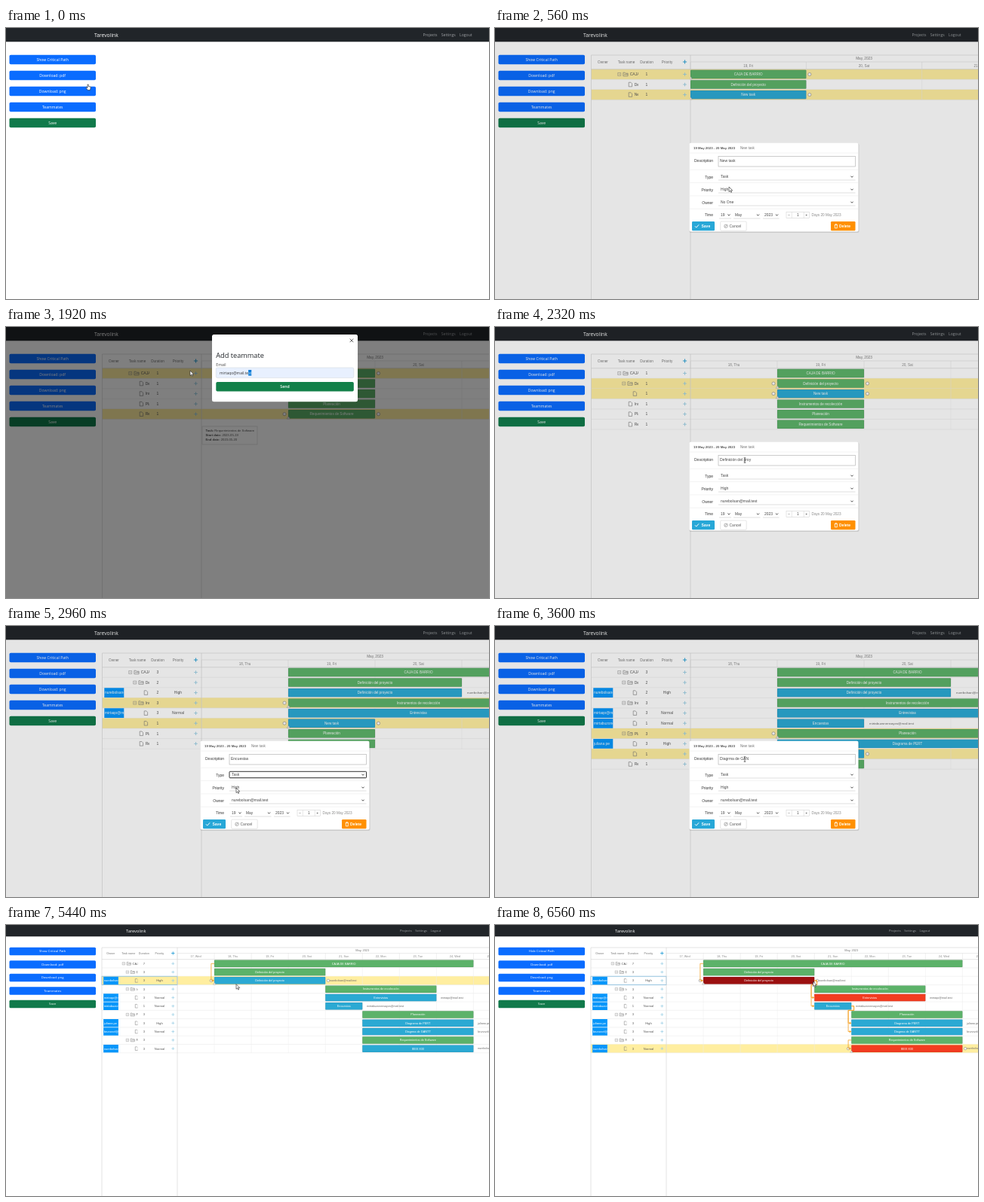
An HTML page for the animation above (6640 ms loop, 640 by 360 pixels).

```html
<!DOCTYPE html>
<html lang="es">
<head>
<meta charset="utf-8">
<title>Project planner</title>
<style>
  html, body { margin: 0; width: 100%; height: 100%; overflow: hidden; background: #fff; }
  #stage { display: block; width: 100vw; height: 100vh; }
  text { font-family: "Liberation Sans", Arial, sans-serif; white-space: pre; }
  .ui { font-family: "Open Sans", "Noto Sans", sans-serif; }
</style>
</head>
<body>
<svg id="stage" viewBox="0 0 640 360"></svg>
<script>
const LOOP = 6640, STEP = 80;
const GREEN = '#5cb269', BLUE = '#2ba9d3', YELLOW = '#ffeea0', ORANGE = '#f5a021';
const MIRTA = 'mirtaqo@mail.test', NURE = 'nurebolsan@mail.test';

// SVG helpers
const rect = (x, y, w, h, fill, more = '') =>
  `<rect x="${x}" y="${y}" width="${w}" height="${h}" fill="${fill}" ${more}/>`;
const path = (d, stroke, width = .6, fill = 'none') =>
  `<path d="${d}" stroke="${stroke}" stroke-width="${width}" fill="${fill}"/>`;
const line = (x1, y1, x2, y2, color, width) => path(`M${x1} ${y1}L${x2} ${y2}`, color, width);
const text = (x, y, str, size, fill, more = '') =>
  `<text x="${x}" y="${y + size * .35}" font-size="${size}" fill="${fill}" ${more}>${str}</text>`;
const MID = ' text-anchor="middle"', END = ' text-anchor="end"', BOLD = ' font-weight="bold"', UI = ' class="ui"';
const clip = (x, y, w, h, inner) =>
  `<svg x="${x}" y="${y}" width="${w}" height="${h}" viewBox="${x} ${y} ${w} ${h}">${inner}</svg>`;
const clamp = v => Math.max(0, Math.min(1, v));
const mix = (a, b, k) => a + (b - a) * k;

// Page zoom and timeline scale over time
const plain = { at: 0, z: 1, left: 127.5, grid: 131.5, total: 460, day0: 19, days: 3, title: 117, links: 552.5 };
const views = [
  plain,
  { ...plain, at: 1200, day0: 18, days: 4 },
  { at: 4160, z: 1.25, left: 128, grid: 150.5, total: 440, day0: 18, days: 6, title: 54.5, links: 598 },
  { at: 5040, z: 5 / 6, left: 127, grid: 100, total: 490.5, day0: 17, days: 10, title: 159, links: 522 }
];

// born: dialog opens, saved: dialog closes; move: [begin, end, new start day]
const task = (name, level, born, saved, more) =>
  ({ name, level, born, saved, days: 1, project: level < 2, ...more });
const tasks = [
  task('CAJA DE BARRIO', 0, 160, 320),
  task('Definición del proyecto', 1, 320, 480),
  task('Definición del proyecto', 2, 2160, 2400,
    { days: 2, owner: NURE, priority: 'High', move: [5200, 5400, 18], stretch: true, critical: '#9c1010' }),
  task('Instrumentos de recolección', 1, 480, 880),
  task('Entrevistas', 2, 2400, 2640,
    { days: 3, owner: MIRTA, priority: 'Normal', move: [4160, 4240, 21], critical: '#f23c20' }),
  task('Encuestas', 2, 2640, 3040,
    { owner: 'mirtabuzonensayos@mail.test', priority: 'Normal', move: [4240, 4400, 21] }),
  task('Planeación', 1, 880, 1200),
  task('Diagrama de PERT', 2, 3040, 3280,
    { days: 3, owner: 'juliana pe', priority: 'High', move: [4400, 4583, 22] }),
  task('Diagrma de GANTT', 2, 3280, 3760,
    { days: 3, owner: 'brunovel@mail.test', priority: 'Normal', move: [4640, 4800, 22] }),
  task('Requerimientos de Software', 1, 1200, 1520),
  task('IEEE 830', 2, 3760, 4080,
    { days: 3, owner: NURE, priority: 'Normal', move: [4800, 4960, 22], critical: '#f23c20' })
];
const [DEF, REQ, IEEE] = [2, 9, 10].map(i => tasks[i]);
tasks.forEach((item, i) =>
  item.parent = tasks.slice(0, i).reverse().find(other => other.level < item.level));
const links = [[0, 2], [2, 4], [2, 5], [5, 7], [5, 8], [9, 10]];

const childrenOf = (item, t) => tasks.filter(other => other.parent === item && other.born <= t);
const draggedAt = t => t >= 4160 && t < 5040 &&
  tasks.find(item => item.move && t >= item.move[0] && t < item.move[1] + 40);

function span(item, t) {
  const spans = childrenOf(item, t).map(child => span(child, t));
  if (spans.length) return [Math.min(...spans.map(s => s[0])), Math.max(...spans.map(s => s[1]))];
  const days = t < item.saved ? 1 : item.days;
  if (!item.move) return [19, 19 + days];
  const [begin, end, day] = item.move;
  const start = mix(19, day, clamp((t - begin) / (end - begin)));
  return [start, (item.stretch ? 19 : start) + days];
}

const dayX = (view, day) => view.left + view.grid + (day - view.day0) * view.total / view.days;
function rowY(view, item, t) {
  const index = tasks.filter(other => other.born <= t).indexOf(item);
  return (61.5 + 13.55 * index) * view.z;
}

function page(view, t) {
  const { z } = view;
  let out = rect(0, 0, 640, 18.3 * z, '#212529') +
    text(view.title, 9.5 * z, 'Tarevolink', 6.75 * z, '#fff', UI);
  ['Projects', 'Settings', 'Logout'].forEach((label, i) =>
    out += text(view.links + i * 24.3 * z, 9.6 * z, label, 5.1 * z, '#a0a3a6', UI));
  const labels = [(t < 5840 ? 'Show' : 'Hide') + ' Critical Path',
    'Download: pdf', 'Download: png', 'Teammates', 'Save'];
  labels.forEach((label, i) => {
    const y = (42 + 21 * i) * z;
    out += rect(4.5, y - 6.2 * z, 114.5, 12.4 * z, i < 4 ? '#0a6cff' : '#117a4b', `rx="${1.8 * z}"`) +
      text(61.7, y, label, 5.1 * z, '#fff', UI + MID);
  });
  return out;
}

function treeIcon(x, y, z, open) {
  const shape = open
    ? path('M-2 -2h4v4h-4zm1 2h2', '#888', .5) + path('M5.2 2.3v-4.6h2.2l1 1h3v3.6zm1 -2.2h5.2', '#777')
    : path('M6.5 -2.8h2.8l1.6 1.6v4h-4.4z', '#777');
  return `<g transform="translate(${x} ${y}) scale(${z})">${shape}</g>`;
}

const plus = (x, y, r, color, width) => path(`M${x - r} ${y}h${2 * r}M${x} ${y - r}v${2 * r}`, color, width);

function tooltip(item, x, y, z, from, to) {
  const lines = [['Task:', item.name], ['Start date:', '2023-05-' + from], ['End date:', '2023-05-' + to]];
  const width = (item.name.length * 2 + 21) * z;
  return rect(x, y, width, 24 * z, '#fff', 'stroke="#ccc" stroke-width=".5"') +
    lines.map(([key, value], i) => text(x + 4.5 * z, y + (6 + 6 * i) * z,
      `<tspan${BOLD}>${key}</tspan> ${value}`, 4.2 * z, '#555')).join('');
}

function taskRow(view, item, t, marked, focused) {
  const { z, left, grid } = view;
  const k = grid / 131.5, pitch = 13.55 * z;
  const y = rowY(view, item, t), rowTop = y - pitch / 2;
  const [start, end] = span(item, t);
  const pending = t < item.saved, name = pending ? 'New task' : item.name;
  const treeX = left + 29.5 * k + (7.7 + 6 * item.level) * z;
  let cells = marked ? rect(left, rowTop, 640 - left, pitch, YELLOW) : '';
  cells += line(left, rowTop + pitch, 640, rowTop + pitch, '#e6e6e6', .5) +
    clip(left + 29.5 * k, rowTop, 33 * k, pitch,
      treeIcon(treeX, y, z, childrenOf(item, t).length) + text(treeX + 14 * z, y, name, 5 * z, '#555')) +
    text(left + 73.5 * k, y, Math.round(end - start), 5 * z, '#555', MID) +
    plus(left + 124 * k, y, 2.3 * z, '#9bcfe4', .9 * z);

  const x = dayX(view, start), xEnd = dayX(view, end), h = 11.4 * z;
  const color = t >= 5840 && item.critical || (item.project && !pending ? GREEN : BLUE);
  let bar = rect(x, y - h / 2, xEnd - x, h, color,
    `rx="${.8 * z}" stroke="#000" stroke-opacity=".18" stroke-width=".5"`) +
    text((x + xEnd) / 2, y, name, 4.6 * z, '#fff', MID);

  if (item.owner && !pending) {
    cells += clip(left + 2.8 * k, rowTop + .4, 26 * k, pitch - .8,
      rect(left, rowTop, 40, pitch, '#0796fa') + text(left + 3.5 * k, y, item.owner, 4.9 * z, '#fff')) +
      text(left + 100.5 * k, y, item.priority, 5 * z, '#555', MID);
    bar += text(xEnd + 7 * z, y, item.owner, 4.4 * z, '#666');
  }
  if (focused) cells += rect(left, rowTop, grid, pitch, 'none', 'stroke="#7fb9dc" stroke-width=".8"');
  if (marked || focused) {
    for (const cx of [x - 5 * z, xEnd + 4.5 * z])
      bar += `<circle cx="${cx}" cy="${y}" r="${2.1 * z}" fill="#fff" stroke="#888" stroke-width=".6"/>`;
    bar += path(`M${x - 2 * z} ${y + 6.3 * z}l${2.2 * z} ${-3 * z}l${2.2 * z} ${3 * z}z`, '#999', .4, '#eee');
  }
  return [cells, bar];
}

function link(view, a, b, t) {
  const { z } = view, ya = rowY(view, a, t), yb = rowY(view, b, t);
  const x = dayX(view, span(b, t)[0]);
  const lead = a.project ? `M${x} ${ya}` : `M${dayX(view, span(a, t)[1])} ${ya}h${4 * z}v${6.8 * z}`;
  return path(`${lead}H${x - 5 * z}V${yb}H${x - 2 * z}`, ORANGE, .8) +
    path(`M${x - 3 * z} ${yb - 2 * z}l${3 * z} ${2 * z}l${-3 * z} ${2 * z}z`, 'none', 0, ORANGE);
}

function ganttHeader(view) {
  const { z, left, grid, total, day0, days } = view;
  const k = grid / 131.5, right = left + grid, body = 54.8 * z;
  let out = line(left, 36 * z, 640, 36 * z, '#d2d2d2') + line(right, 45 * z, 640, 45 * z, '#dedede') +
    line(left, body, 640, body, '#d2d2d2') +
    line(left, 36 * z, left, 360, '#d2d2d2') + line(right, 36 * z, right, 360, '#d2d2d2') +
    plus(left + 124 * k, 45 * z, 2.6 * z, '#35a5d8', 1.1 * z) +
    text(right + total / 2, 40.5 * z, 'May, 2023', 4.7 * z, '#777', MID);
  ['Owner', 'Task name', 'Duration', 'Priority'].forEach((label, i) =>
    out += text(left + (i ? 19.5 + 27 * i : 15.5) * k, 45 * z, label, 4.7 * Math.min(z, k * 1.05), '#777', MID));
  const week = ['Sun', 'Mon', 'Tue', 'Wed', 'Thu', 'Fri', 'Sat'];
  for (let day = day0; day < day0 + days; day++)
    out += text(dayX(view, day + .5), 50 * z, `${day}, ${week[day % 7]}`, 4.6 * z, '#888', MID) +
      line(dayX(view, day), 45 * z, dayX(view, day), body, '#dedede', .5);
  return out;
}

function gantt(view, t) {
  const { z, left, grid, day0, days } = view;
  const right = left + grid, body = 54.8 * z;
  const rows = tasks.filter(item => item.born <= t);
  const newest = rows.reduce((a, b) => b.born > a.born ? b : a, rows[0] || {});
  const selected = t < 4160 ? [newest, newest.parent] : [t < 5680 ? DEF : IEEE];
  const dragged = draggedAt(t);
  const focus = dragged || (t >= 5200 ? DEF : null);

  let cells = '', chart = '', tip = '';
  for (let i = 0; i < days; i++) {
    const x = dayX(view, day0 + i);
    chart += line(x, body, x, body + rows.length * 13.55 * z, '#ebebeb', .5);
  }
  for (const item of rows) {
    const [row, bar] = taskRow(view, item, t, selected.includes(item), item === focus);
    cells += row;
    chart += bar;
  }
  links.forEach(([from, to], i) => {
    if (t >= 5440 + i * 40) chart += link(view, tasks[from], tasks[to], t);
  });
  if (dragged)
    tip = tooltip(dragged, dayX(view, span(dragged, t)[0]) + 4.5 * z, rowY(view, dragged, t) + 8 * z, z, 19, 22);
  if (t >= 1520 && t < 2080) tip = tooltip(REQ, 260, 132, z, 19, 20);
  if (t >= 6000 && t < 6320) tip = tooltip(IEEE, 550, 180, z, 22, 25);
  return cells + ganttHeader(view) + clip(right, body, 640 - right, 360 - body, chart) + tip;
}

const chevron = (x, y) => path(`M${x - 1.6} ${y - .8}l1.6 1.6l1.6 -1.6`, '#333', .9);

function taskDialog(item, t) {
  const progress = (t - item.born) / (item.saved - item.born);
  const typed = (progress - .3) / .45;
  const description = typed <= 0 ? 'New task' : item.name.slice(0, Math.ceil(clamp(typed) * item.name.length));
  let out = rect(0, 0, 640, 360, '#000', 'opacity=".1"') +
    rect(257.5, 153.5, 225, 118.5, '#000', 'opacity=".12" rx="2"') +
    rect(257.5, 152.8, 224, 117.7, '#fff', 'rx="2"') +
    text(263, 159.7, '19 May 2023 - 20 May 2023', 4.4, '#555', BOLD) + text(325, 159.7, 'New task', 4.6, '#777') +
    line(258, 166, 481, 166, '#e6e6e6', .5);
  ['Description', 'Type', 'Priority', 'Owner', 'Time'].forEach((label, i) => {
    out += text(289, i ? 181.6 + 16.75 * i : 176, label, 5, '#666', END + ' stroke="#666" stroke-width=".12"');
    if (i) out += line(258, 171 + 17.3 * i, 481, 171 + 17.3 * i, '#e6e6e6', .5);
  });
  out += rect(296, 170.5, 181.5, 13.5, '#fff', 'stroke="#aaa" stroke-width=".6"') +
    text(298, 176.3, description, 5, '#444');
  ['Task', 'High', t < 2080 ? 'No One' : NURE].forEach((value, i) => {
    const y = 197.5 + 17 * i;
    out += text(299, y, value, 5, '#444') + chevron(473, y) + line(296, y + 4.5, 477.5, y + 4.5, '#ccc');
  });
  if (progress > .75) out += rect(296, 193.3, 181.5, 8.4, 'none', 'stroke="#333" stroke-width="1" rx=".8"');
  [['19', 299, 310], ['May', 318, 348.5], ['2023', 357, 373.5]].forEach(([value, x, arrow]) =>
    out += text(x, 248.4, value, 4.9, '#444') + chevron(arrow, 248.4) + line(x - 2, 253, arrow + 3, 253, '#ccc'));
  out += rect(386, 244.5, 30.5, 8, '#fff', 'stroke="#ccc" stroke-width=".5"') +
    path('M393.3 244.5v8M409.3 244.5v8', '#ccc', .5);
  ['−', '1', '+'].forEach((label, i) => out += text(389.8 + 11.5 * i, 248.4, label, 4.9, '#444', MID));
  return out + text(419.5, 248.4, 'Days 20 May 2023', 4.7, '#888') +
    rect(261, 257, 30, 12.3, '#27a7d7', 'rx="1.2"') + path('M265 263.3l1.7 1.8l3.4 -3.8', '#fff', 1) +
    text(273.5, 263.2, 'Save', 5, '#fff', BOLD) +
    rect(298.7, 257, 34.5, 12.3, '#fff', 'rx="1.2" stroke="#ccc" stroke-width=".5"') +
    '<circle cx="306" cy="263.2" r="2.2" fill="none" stroke="#777" stroke-width=".6"/>' +
    line(304.5, 264.7, 307.5, 261.7, '#777') + text(310.5, 263.2, 'Cancel', 5, '#555') +
    rect(445, 257, 32.5, 12.3, '#ff9000', 'rx="1.2"') +
    path('M449.8 261.5h4M450.3 261.5v4.3h3v-4.3M451 260.4h1.6', '#fff', .8) +
    text(456, 263.2, 'Delete', 5, '#fff', BOLD);
}

const ruler = document.createElement('canvas').getContext('2d');

function teammateModal(t) {
  const count = Math.min(MIRTA.length, Math.floor((t - 1680) / 16));
  const completed = count >= 5, shown = completed ? MIRTA : MIRTA.slice(0, count);
  ruler.font = '49px "Open Sans", "Noto Sans", sans-serif';
  const width = str => ruler.measureText(str).width / 10;
  const rest = completed ? MIRTA.slice(count) : '', restX = 283 + width(MIRTA.slice(0, count));
  return rect(0, 0, 640, 360, '#000', 'opacity=".5"') + rect(273, 10, 193, 89.3, '#fff', 'rx="2.5"') +
    path('M455.6 15.6l4.6 4.6m0 -4.6l-4.6 4.6', '#555', .9) +
    text(278.3, 38, 'Add teammate', 9.2, '#212529', UI) + text(278.3, 50, 'Email', 5.2, '#444', UI) +
    rect(278.3, 54, 182.5, 13.6, completed ? '#e8f0fe' : '#fff', 'rx="1.8" stroke="#ced4da" stroke-width=".5"') +
    text(283, 61, shown, 4.9, '#333', UI) +
    (rest && rect(restX, 57, width(rest), 7.6, '#0078d7') + text(restX, 61, rest, 4.9, '#fff', UI)) +
    rect(278.3, 73, 182.5, 12.6, '#128049', 'rx="1.8"') +
    text(369.5, 79.2, 'Send', 5.2, '#fff', UI + MID + ' font-weight="600"');
}

// Pointer stops: [time, x, y], and [dialog progress, x, y] while a dialog is open
const stops = [
  [0, 108, 75], [160, 251, 45], [1520, 275, 263], [1680, 80, 105], [1920, 244, 58], [2080, 370, 79],
  [2160, 251, 75], [4080, 275, 263], [5040, 380, 60], [5200, 325, 74], [5400, 276, 74], [5600, 421, 97],
  [5800, 80, 34], [6000, 546, 164], [6320, 546, 164], [6480, 425, 76], [LOOP, 418, 74]
];
const dialogStops = [[0, 251, 75], [.2, 310, 211], [.35, 330, 177], [.67, 331, 177], [.8, 305, 215], [1.01, 275, 263]];

function along(points, at) {
  const next = points.findIndex(point => point[0] > at);
  const [t0, x0, y0] = points[next - 1], [t1, x1, y1] = points[next];
  const k = (at - t0) / (t1 - t0);
  return [mix(x0, x1, k), mix(y0, y1, k)];
}

function cursor(view, t, editing) {
  const dragged = draggedAt(t);
  let [x, y] = editing ? along(dialogStops, (t - editing.born) / (editing.saved - editing.born)) : along(stops, t);
  let shape = path('M0 0v6.6l1.6 -1.4l1.1 2.3l1 -.5l-1.1 -2.2h2.1z', '#222', .6, '#fff');
  if (dragged) {
    x = Math.min(637, dayX(view, span(dragged, t)[0]) + 162);
    y = rowY(view, dragged, t) - 5.5;
    shape = path('M-4 0h8M0 -4v8M-3 -1l-1 1l1 1M3 -1l1 1l-1 1M-1 -3l1 -1l1 1M-1 3l1 1l1 -1', '#333', .9);
  } else if (editing && y > 170 && y < 184) {
    shape = path('M-1.3 -3.2h2.6m-1.3 0v6.4m-1.3 0h2.6', '#333', .7);
  } else if (x < 119) {
    shape = path('M0 0v4.5l-1.5 -.8l-.4 .8l2.2 3h3.2l.9 -4.2l-3.2 -.8v-2.5z', '#222', .6, '#fff');
  }
  return `<g transform="translate(${x} ${y})">${shape}</g>`;
}

function scene(t) {
  const view = views.filter(v => v.at <= t).pop();
  const editing = tasks.find(item => item.born <= t && t < item.saved);
  let out = page(view, t);
  if (t >= 80) out += gantt(view, t);
  if (editing) out += taskDialog(editing, t);
  if (t >= 1680 && t < 2080) out += teammateModal(t);
  return out + cursor(view, t, editing);
}

const stage = document.getElementById('stage');
const began = performance.now();
let drawn = -1;
function tick() {
  const t = Math.floor((performance.now() - began) % LOOP / STEP) * STEP;
  if (t !== drawn) stage.innerHTML = scene(drawn = t);
  requestAnimationFrame(tick);
}
tick();
</script>
</body>
</html>
```
